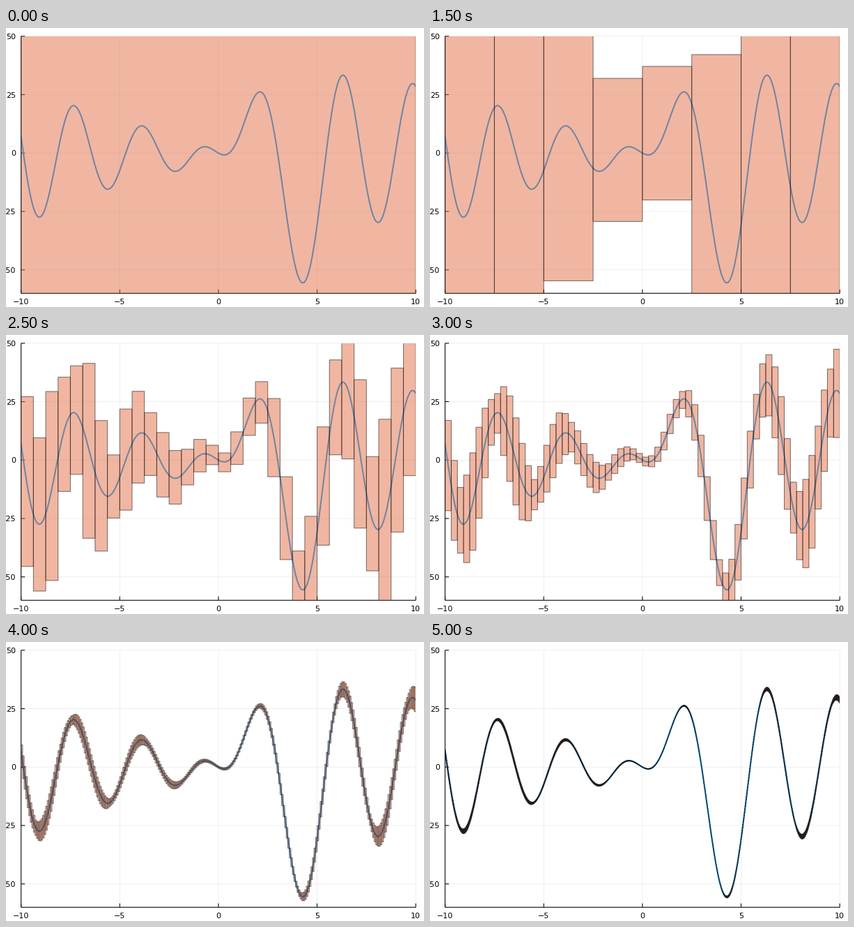
Recreate the animation shown at these times as a matplotlib script. Size 600 px wide and 400 px high, loop 5.5 s.

```python
import numpy as np
import matplotlib.pyplot as plt
from matplotlib.animation import FuncAnimation
from matplotlib.collections import LineCollection, PolyCollection
from matplotlib.path import Path

W, H, DPI = 600, 400, 100
PX = 72 / DPI
LEFT, RIGHT, TOP, BOTTOM = 21.65, 588.19, 11.81, 380.31
XMIN, XMAX, YMIN, YMAX = -10, 10, -60, 50
STEPS = 11

plt.rcParams["font.family"] = "DejaVu Sans"


def f(x):
    return -sum(k * x * np.sin(k * (x - 3) / 3) for k in range(1, 6))


def sin_range(a, b):
    """Bounds of sin over the intervals [a, b]."""
    def hits(phase):
        return np.floor((b - phase) / (2 * np.pi)) >= np.ceil((a - phase) / (2 * np.pi))

    lo = np.where(hits(-np.pi / 2), -1, np.minimum(np.sin(a), np.sin(b)))
    hi = np.where(hits(np.pi / 2), 1, np.maximum(np.sin(a), np.sin(b)))
    return lo, hi


def f_range(a, b):
    """Interval-arithmetic enclosure of f over [a, b], term by term."""
    lo, hi = np.zeros_like(a), np.zeros_like(a)
    for k in range(1, 6):
        s, t = sin_range(k * (a - 3) / 3, k * (b - 3) / 3)
        corners = k * np.array([a * s, a * t, b * s, b * t])
        lo -= corners.max(axis=0)
        hi -= corners.min(axis=0)
    return lo, hi


def boxes(n):
    edges = np.linspace(XMIN, XMAX, n + 1)
    a, b = edges[:-1], edges[1:]
    lo, hi = f_range(a, b)
    return np.stack([np.column_stack(c) for c in ((a, lo), (b, lo), (b, hi), (a, hi))], axis=1)


def px_x(x):
    return LEFT + (x - XMIN) / (XMAX - XMIN) * (RIGHT - LEFT)


def px_y(y):
    return BOTTOM - (y - YMIN) / (YMAX - YMIN) * (BOTTOM - TOP)


def label(x, y, value, ha):
    fig.text(x / W, 1 - y / H, str(value).replace("-", "\u2212"),
             size=8, ha=ha, va="baseline")


fig = plt.figure(figsize=(W / DPI, H / DPI), dpi=DPI, facecolor="white")

# Canvas in pixels, origin at the top left, for grid and axes
canvas = fig.add_axes([0, 0, 1, 1], xlim=(0, W), ylim=(H, 0))
canvas.axis("off")

xticks, yticks = range(-10, 11, 5), range(-50, 51, 25)
tick = 5.5
grid, frame = [], [[(LEFT, TOP), (LEFT, BOTTOM)], [(LEFT, BOTTOM), (RIGHT, BOTTOM)]]
for v in xticks:
    x = px_x(v)
    grid.append([(x, TOP), (x, BOTTOM)])
    frame.append([(x, BOTTOM), (x, BOTTOM - tick)])
    label(x, 395.5, v, "center")
for v in yticks:
    y = px_y(v)
    grid.append([(LEFT, y), (RIGHT, y)])
    frame.append([(LEFT, y), (LEFT + tick, y)])
    label(14, y + 4, v, "right")
for segs, width, alpha in ((grid, 0.6, 0.1), (frame, 1.05, 1)):
    canvas.add_collection(LineCollection(segs, colors=[(0, 0, 0, alpha)],
                                         linewidths=width * PX, snap=False))

ax = fig.add_axes([LEFT / W, 1 - BOTTOM / H, (RIGHT - LEFT) / W, (BOTTOM - TOP) / H],
                  xlim=(XMIN, XMAX), ylim=(YMIN, YMAX))
ax.axis("off")
xs = np.linspace(XMIN, XMAX, 241)
curve, = ax.plot(xs, f(xs), color="#009AFA", lw=2 * PX, snap=False, zorder=1)
cover = PolyCollection(boxes(1), facecolors=[(0.886, 0.435, 0.275, 0.5)],
                       edgecolors=[(0, 0, 0, 0.5)], linewidths=1.05 * PX,
                       joinstyle="miter", snap=False, zorder=2)
ax.add_collection(cover, autolim=False)
for artist in (curve, cover):
    artist.set_clip_path(Path.unit_rectangle(), ax.transAxes)


def update(i):
    cover.set_verts(boxes(2 ** i))
    return cover,


anim = FuncAnimation(fig, update, frames=STEPS, interval=500, repeat=True,
                     repeat_delay=0, blit=False)
plt.show()
```
